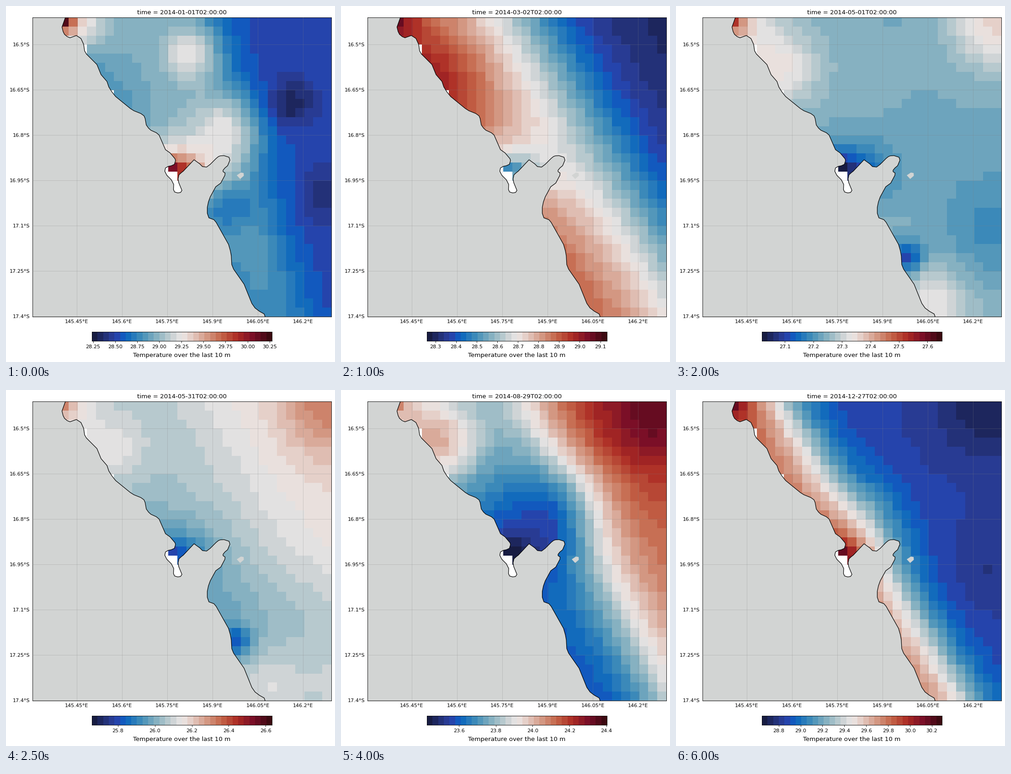
Write a matplotlib script that moves like this. It is 720 px wide and 778 px high and loops after 6.5 s.

```python
import numpy as np
import matplotlib.pyplot as plt
from matplotlib.animation import FuncAnimation
from matplotlib.colors import LinearSegmentedColormap
from matplotlib.ticker import MaxNLocator, ScalarFormatter

WIDTH, HEIGHT, DPI = 720, 778, 80
LEFT, RIGHT, TOP, BOTTOM = 58, 712, 25, 679
CELLS = 33
STEPS = 13
LAND = "#d2d4d3"

plt.rcParams["font.family"] = "DejaVu Sans"

# Diverging blue-white-red map in discrete bands
STOPS = [
    (0, "#171c42"), (1 / 11, "#293a8f"), (0.128, "#2644ac"), (0.155, "#1556bf"),
    (2 / 11, "#0b66bd"), (3 / 11, "#4590b9"), (4 / 11, "#8eb5c2"),
    (5 / 11, "#d2d6d7"), (0.5, "#ece8e7"), (6 / 11, "#e6d2cc"),
    (7 / 11, "#d59d89"), (8 / 11, "#c46548"), (9 / 11, "#ac2b24"),
    (10 / 11, "#780e28"), (1, "#3c0911"),
]
CMAP = LinearSegmentedColormap.from_list("thermal", STOPS, N=32)

# Coast in pixels: north shore, bay, cape and south shore
NORTH = [
    (130, 25), (122.5, 46), (125, 56), (128, 62), (134, 67), (140, 69.5),
    (154, 64.5), (164, 71), (170, 84), (172, 98), (176, 105), (199, 128),
    (208, 150), (221, 165), (225, 177), (232, 188), (240, 198), (272, 224),
    (280, 229), (295, 235), (302, 240), (304.5, 246), (307, 260), (312, 267),
    (317, 271.5), (329, 277), (335, 282), (349, 314), (359, 321),
]
BAY = [
    (370, 334), (371, 338), (368.5, 346), (362, 349), (355, 350.5), (349, 354),
    (347.5, 361), (352, 370), (362, 380), (367, 390), (366.5, 401),
    (369, 406.5), (376, 408.5), (382, 407.5), (385, 403), (378, 386),
    (376.5, 378), (378.5, 369), (384, 364), (388, 361), (411.5, 336),
    (424, 345), (430, 351), (439, 352), (447, 346), (460, 333), (465, 329),
]
SOUTH = [
    (469, 327.5), (477, 327), (488, 330.5), (490, 337), (485, 349), (479, 354),
    (475, 359), (475, 362), (479.5, 365), (479, 370), (470, 387), (459, 395),
    (447, 417), (443, 428), (440.5, 440), (440.5, 453), (444, 463), (455, 467),
    (460, 473), (487, 521), (491, 535), (493, 546), (494, 565), (498, 575),
    (521, 608), (538, 650), (545, 660), (555, 667.5), (565, 673), (567, 679),
]
ISLAND = [(505, 370), (514, 364), (520, 365), (520.5, 371), (512.5, 378)]

ROW, COL = np.mgrid[:CELLS, :CELLS]
SOUTHING = ROW / (CELLS - 1)
OFFSHORE = np.maximum(COL - 3.2 - 0.68 * ROW, 0)  # cells from a straight shore


def dry_cells():
    dry = np.zeros((CELLS, CELLS), bool)
    dry[3, 5] = dry[8, 8] = dry[16, 14] = True
    dry[17:20, 14:16] = dry[18:20, 16] = True
    return dry


DRY = dry_cells()


def distance(col, row, wide=1, high=1):
    return np.hypot((COL - col) / wide, (ROW - row) / high)


def water(inshore, offshore, front, width, shift=0, tilt=0, coast=0,
          inlet=0, bay=0, eddies=()):
    """Percent of the temperature range: a front along the shore plus local
    anomalies. Each eddy is (column, row, radius, strength)."""
    across = (OFFSHORE - front - shift * SOUTHING) / width
    field = inshore + (offshore - inshore) / (1 + np.exp(-across))
    field += tilt * SOUTHING + coast * np.exp(-OFFSHORE / 3)
    field += inlet * np.exp(-distance(3, 0, 2, 2))
    field += bay * np.exp(-distance(15, 16.5, 3, 2))
    for col, row, radius, strength in eddies:
        field += strength * np.exp(-distance(col, row, radius, radius) ** 2)
    return np.clip(field / 100, 0, 1)


# Step -> (lowest, highest temperature, field)
SURVEYS = {
    0: (28.237, 30.276, water(
        35, 14, 16, 1.5, shift=-12, coast=-8, inlet=68, bay=75,
        eddies=[(17, 3.5, 3, 16), (21.5, 11.5, 3.5, 16), (28, 9, 2.5, -11),
                (21, 20, 3, -14), (32, 19, 3, -7)])),
    2: (28.258, 29.132, water(
        70, 4, 13.5, 4, shift=-3, coast=6, inlet=18, bay=-58,
        eddies=[(8, 6, 5, 10)])),
    4: (27.019, 27.651, water(
        37, 34, 10, 3, inlet=42, bay=-46,
        eddies=[(8, 5, 4, 14), (32, 0, 5, 20), (31, 23, 6, -8),
                (25, 31, 4, 13), (22, 26, 1.8, -22)])),
    7: (22.939, 24.601, water(
        42, 100, 15.5, 4.5, shift=-9, tilt=-12, bay=-5,
        eddies=[(21, 23, 5, -14), (22, 26, 1.5, -14)])),
    8: (23.426, 24.403, water(
        28, 80, 14.5, 2.5, shift=-8, tilt=-15, inlet=30, bay=-30,
        eddies=[(7, 4, 5, 33), (31, 1, 6, 14), (21, 11, 5, -18)])),
    10: (25.499, 26.592, water(
        78, 6, 7, 2.3, shift=-1, inlet=22, bay=38,
        eddies=[(18, 11, 3, 10), (21, 21, 4, -10), (32, 16, 4, -4)])),
    12: (28.647, 30.292, water(
        72, 13, 5.3, 2, shift=-2, inlet=25, bay=34,
        eddies=[(18, 12, 4, 8), (31, 0, 6, -9), (31, 18, 5, -4)])),
}


def survey(step):
    """Temperature range and field, blended between the nearest surveys."""
    before = max(k for k in SURVEYS if k <= step)
    after = min(k for k in SURVEYS if k >= step)
    mix = (step - before) / max(after - before, 1)
    lo, hi, field = [a + (b - a) * mix
                     for a, b in zip(SURVEYS[before], SURVEYS[after])]
    return lo, hi, np.where(DRY, np.nan, field)


fig = plt.figure(figsize=(WIDTH / DPI, HEIGHT / DPI), dpi=DPI, facecolor="white")


def pixel_axes(x0, y0, x1, y1):
    return fig.add_axes([x0 / WIDTH, 1 - y1 / HEIGHT,
                         (x1 - x0) / WIDTH, (y1 - y0) / HEIGHT])


def degrees(first, count, side):
    return [f"{first + 0.15 * i:.2f}".rstrip("0") + "°" + side
            for i in range(count)]


ax = pixel_axes(LEFT, TOP, RIGHT, BOTTOM)
sea = ax.imshow(np.zeros((CELLS, CELLS)), cmap=CMAP, vmin=0, vmax=1,
                extent=(LEFT, RIGHT, BOTTOM, TOP), aspect="auto",
                interpolation="nearest")
shore = NORTH + BAY + SOUTH
ax.fill(*zip(*shore, (LEFT, BOTTOM), (LEFT, TOP)), color=LAND, lw=0, zorder=2)
ax.fill(*zip(*ISLAND), color=LAND, lw=0, zorder=2)
ax.plot(*zip(*shore), color="black", lw=1.1, zorder=3)
ax.set_xlim(LEFT, RIGHT)
ax.set_ylim(BOTTOM, TOP)
ax.set_xticks([155 + 99 * i for i in range(6)], degrees(145.45, 6, "E"))
ax.set_yticks([83.7 + 99.1 * i for i in range(7)], degrees(16.5, 7, "S"))
ax.tick_params(length=0, pad=5, labelsize=10)
ax.set_axisbelow(False)
ax.grid(color="gray", alpha=0.5, lw=0.5)
title = ax.set_title("", fontsize=12, pad=6)

bar = pixel_axes(188, 712, 582, 732)
ramp = bar.imshow(np.linspace(0, 1, 256)[None], cmap=CMAP, aspect="auto",
                  interpolation="nearest")
bar.set_yticks([])
bar.xaxis.set_major_locator(MaxNLocator(9, steps=[1, 2, 2.5, 5, 10]))
bar.xaxis.set_major_formatter(ScalarFormatter(useOffset=False))
bar.tick_params(labelsize=10)
fig.text(385 / WIDTH, 1 - 767.3 / HEIGHT, "Temperature over the last 10 m",
         fontsize=12, ha="center", va="baseline")

START = np.datetime64("2014-01-01T02:00:00")


def draw(step):
    lo, hi, field = survey(step)
    sea.set_data(field)
    ramp.set_extent((lo, hi, 0, 1))
    bar.set_xlim(lo, hi)
    title.set_text(f"time = {START + np.timedelta64(30 * step, 'D')}")
    return sea, ramp, title


anim = FuncAnimation(fig, draw, frames=STEPS, interval=500, repeat=True,
                     repeat_delay=0, blit=False)
plt.show()
```
